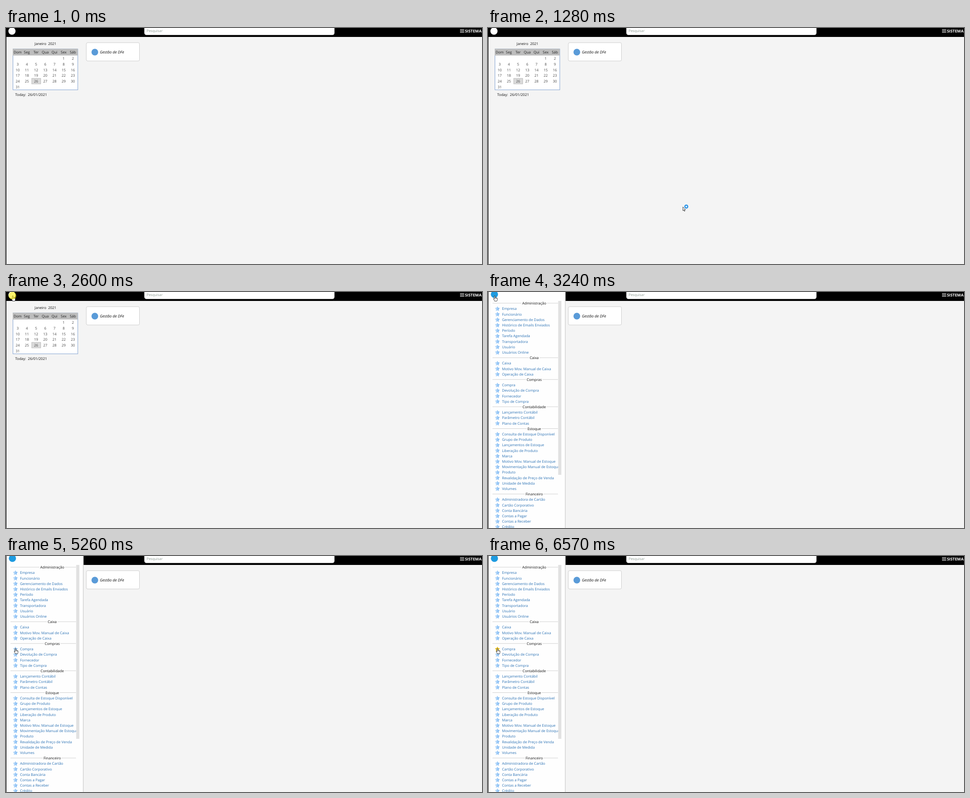
Animation, 1061 px wide and 528 px high, one loop 8 s. Source, as an HTML page:

```html
<!DOCTYPE html>
<html lang="pt-BR">
<head>
<meta charset="utf-8">
<title>Menu do sistema</title>
<style>
  html, body { margin: 0; width: 100%; height: 100%; overflow: hidden; background: #f4f4f4; }
  svg { display: block; width: 1061px; height: 528px; }
  text { font: 8px "Open Sans", "Noto Sans", sans-serif; text-rendering: geometricPrecision; white-space: pre; }
</style>
</head>
<body>
<svg id="stage" viewBox="0 0 1061 528">
  <defs>
    <linearGradient id="blueStar">
      <stop offset=".3" stop-color="#b4d8fa"/>
      <stop offset=".75" stop-color="#80b8f2"/>
    </linearGradient>
  </defs>
</svg>
<script>
const LOOP = 8000;
const stage = document.getElementById('stage');

function add(parent, tag, attrs = {}, content) {
  const el = document.createElementNS('http://www.w3.org/2000/svg', tag);
  for (const key in attrs) el.setAttribute(key, attrs[key]);
  if (content !== undefined) el.textContent = content;
  parent.append(el);
  return el;
}
const group = parent => add(parent, 'g');
const rect = (parent, x, y, width, height, fill, more) =>
  add(parent, 'rect', { x, y, width, height, fill, ...more });
const circle = (parent, cx, cy, r, fill, more) =>
  add(parent, 'circle', { cx, cy, r, fill, ...more });
const label = (parent, x, y, content, fill, more) =>
  add(parent, 'text', { x, y, fill, ...more }, content);
const centered = { 'text-anchor': 'middle' };

function drawHeader() {
  rect(stage, 0, 0, 1061, 20, '#000');
  rect(stage, 0, 0, 1, 528, '#000');
  circle(stage, 13.3, 7, 8, '#fff');
  rect(stage, 308.5, -8, 423.5, 23.5, '#fff', { rx: 4.5, stroke: '#ccc', 'stroke-width': .6 });
  label(stage, 313.5, 9, 'Pesquisar', '#8c9a92', { style: 'font-size:7.8px' });
  for (let i = 0; i < 3; i++) rect(stage, 1012, 3 + i * 3, 9.5, 1.2, '#fff');
  label(stage, 1023, 10, 'SISTEMA', '#fff', { style: 'font-size:8.8px;font-weight:700' });
}

function drawCalendar() {
  label(stage, 88, 38, 'Janeiro  2021', '#111', centered);
  rect(stage, 15.5, 47, 144.5, 91.3, '#fff', { stroke: '#7f9fd0' });
  rect(stage, 15, 46.5, 145, 15, '#bdbdbd');
  rect(stage, 57.2, 112.7, 20.2, 12.4, '#dadada', { stroke: '#b4b4b4', 'stroke-width': .8 });
  const colX = col => 26 + col * 20.5;
  ['Dom', 'Seg', 'Ter', 'Qua', 'Qui', 'Sex', 'Sáb'].forEach((day, col) =>
    label(stage, colX(col), 57.2, day, '#222', centered));
  for (let day = 1; day <= 31; day++) {
    const cell = day + 4;
    label(stage, colX(cell % 7), 71 + Math.floor(cell / 7) * 12.75, day, '#484848', centered);
  }
  label(stage, 20.5, 152.4, 'Today:  26/01/2021', '#111');
}

function drawCard() {
  rect(stage, 179, 32.8, 118.5, 41, '#fff', { rx: 3, stroke: '#ccc' });
  circle(stage, 198, 54, 7.5, '#5a9bd8');
  label(stage, 209.3, 56.6, 'Gestão de DFe', '#111', { style: 'font-size:8.6px;font-style:italic' });
}

const sections = [
  ['Administração', 'Empresa', 'Funcionário', 'Gerenciamento de Dados', 'Histórico de Emails Enviados',
    'Período', 'Tarefa Agendada', 'Transportadora', 'Usuário', 'Usuários Online'],
  ['Caixa', 'Caixa', 'Motivo Mov. Manual de Caixa', 'Operação de Caixa'],
  ['Compras', 'Compra', 'Devolução de Compra', 'Fornecedor', 'Tipo de Compra'],
  ['Contabilidade', 'Lançamento Contábil', 'Parâmetro Contábil', 'Plano de Contas'],
  ['Estoque', 'Consulta de Estoque Disponível', 'Grupo de Produto', 'Lançamentos de Estoque',
    'Liberação de Produto', 'Marca', 'Motivo Mov. Manual de Estoque', 'Movimentação Manual de Estoque',
    'Produto', 'Revalidação de Preço de Venda', 'Unidade de Medida', 'Volumes'],
  ['Financeiro', 'Administradora de Cartão', 'Cartão Corporativo', 'Conta Bancária', 'Contas a Pagar',
    'Contas a Receber', 'Crédito']
];

function star(parent, cx, cy) {
  const points = Array.from({ length: 10 }, (_, i) => {
    const r = i % 2 ? 2.8 : 5.2;
    const a = i * Math.PI / 5;
    return `${(cx + r * Math.sin(a)).toFixed(2)},${(cy - r * Math.cos(a)).toFixed(2)}`;
  });
  return add(parent, 'polygon', {
    points: points.join(' '), fill: 'url(#blueStar)',
    stroke: '#a3cdf6', 'stroke-width': .7, 'stroke-linejoin': 'round'
  });
}

function drawMenu() {
  const menu = group(stage);
  const stars = {};
  rect(menu, 1, 0, 172, 528, '#fefefe');
  rect(menu, 171.6, 0, 1.4, 528, '#cfcfcf');
  circle(menu, 14.3, 5.3, 8, '#1e9be0');
  let row = 0;
  for (const [title, ...items] of sections) {
    const y = 25.2 + 12.2 * row++;
    rect(menu, 10, y - .7, 146, 1, '#cfcfcf');
    const gap = rect(menu, 0, y - 5, 0, 10, '#fefefe');
    const width = label(menu, 103, y + 2.9, title, '#111', centered).getComputedTextLength() + 3;
    gap.setAttribute('x', 103 - width / 2);
    gap.setAttribute('width', width);
    for (const item of items) {
      const itemY = 25.2 + 12.2 * row++;
      stars[item] = star(menu, 21, itemY + .4);
      label(menu, 31.2, itemY + 2.9, item, '#2a71b4');
    }
  }
  rect(menu, 156.5, 20, 7, 389, '#e1e1e1');
  return { menu, favorite: stars.Compra };
}

function drawCursors() {
  const outline = { fill: '#fff', stroke: '#111', 'stroke-width': .8, 'stroke-linejoin': 'round' };
  const arrowPath = 'M.4 .4V8.7L2.3 7L3.6 10L5 9.4L3.7 6.6H6.2Z';
  const arrow = group(stage);
  add(arrow, 'path', { d: arrowPath, ...outline });
  const busy = group(stage);
  add(busy, 'path', { d: arrowPath, ...outline });
  circle(busy, 8, -.5, 3.2, '#e8f4ff', { stroke: '#2b93e6', 'stroke-width': 2.5 });
  const hand = group(stage);
  add(hand, 'path', {
    d: 'M-1 8V1.3Q-1 .4 0 .4T1 1.3V4.5Q2.4 3.8 2.8 5Q4 4.4 4.4 5.5Q5.8 5.2 5.8 6.6V9Q5.8 10.5 4.8 12.4H-.3Q-.7 10.7-2.5 8.2Q-3.2 6.8-2.2 6.6Q-1.6 6.6-1 8Z',
    ...outline
  });
  add(hand, 'path', { d: 'M1 4.5V7M2.8 5V7M4.4 5.5V7.2', stroke: '#111', 'stroke-width': .6 });
  return { arrow, busy, hand };
}

drawHeader();
drawCalendar();
drawCard();
const { menu, favorite } = drawMenu();
const cursors = drawCursors();
const halo = circle(stage, 0, 0, 8.5, '#fbec00', { opacity: .58 });

const steps = [
  { at: 0 },
  { at: 640, cursor: 'busy', x: 816, y: 488 },
  { at: 1280, cursor: 'busy', x: 434, y: 400 },
  { at: 1960, cursor: 'busy', x: 158, y: 327 },
  { at: 2600, cursor: 'hand', x: 15, y: 8, pressed: true },
  { at: 3240, cursor: 'hand', x: 15, y: 8 },
  { at: 3890, cursor: 'arrow', x: 24, y: 44.3 },
  { at: 4530, cursor: 'hand', x: 21.2, y: 204.2 },
  { at: 5260, cursor: 'hand', x: 21, y: 206.3, pressed: true, noHalo: true },
  { at: 5910, cursor: 'hand', x: 21, y: 206.3, pressed: true },
  { at: 6570, cursor: 'hand', x: 21, y: 206.3 }
];
const show = (el, on) => el.setAttribute('visibility', on ? 'visible' : 'hidden');

function render(t) {
  const step = steps.findLast(s => s.at <= t);
  show(menu, t >= 3240);
  for (const name in cursors) {
    show(cursors[name], step.cursor === name);
    if (step.cursor === name) cursors[name].setAttribute('transform', `translate(${step.x} ${step.y})`);
  }
  show(halo, step.pressed && !step.noHalo);
  if (step.pressed) {
    halo.setAttribute('cx', step.x - .5);
    halo.setAttribute('cy', step.y + .2);
  }
  const marked = t >= 6570;
  favorite.setAttribute('fill', marked ? '#fbd320' : 'url(#blueStar)');
  favorite.setAttribute('stroke', marked ? '#e3b100' : '#a3cdf6');
}

const start = performance.now();
function tick() {
  render((performance.now() - start) % LOOP);
  requestAnimationFrame(tick);
}
tick();
</script>
</body>
</html>
```
